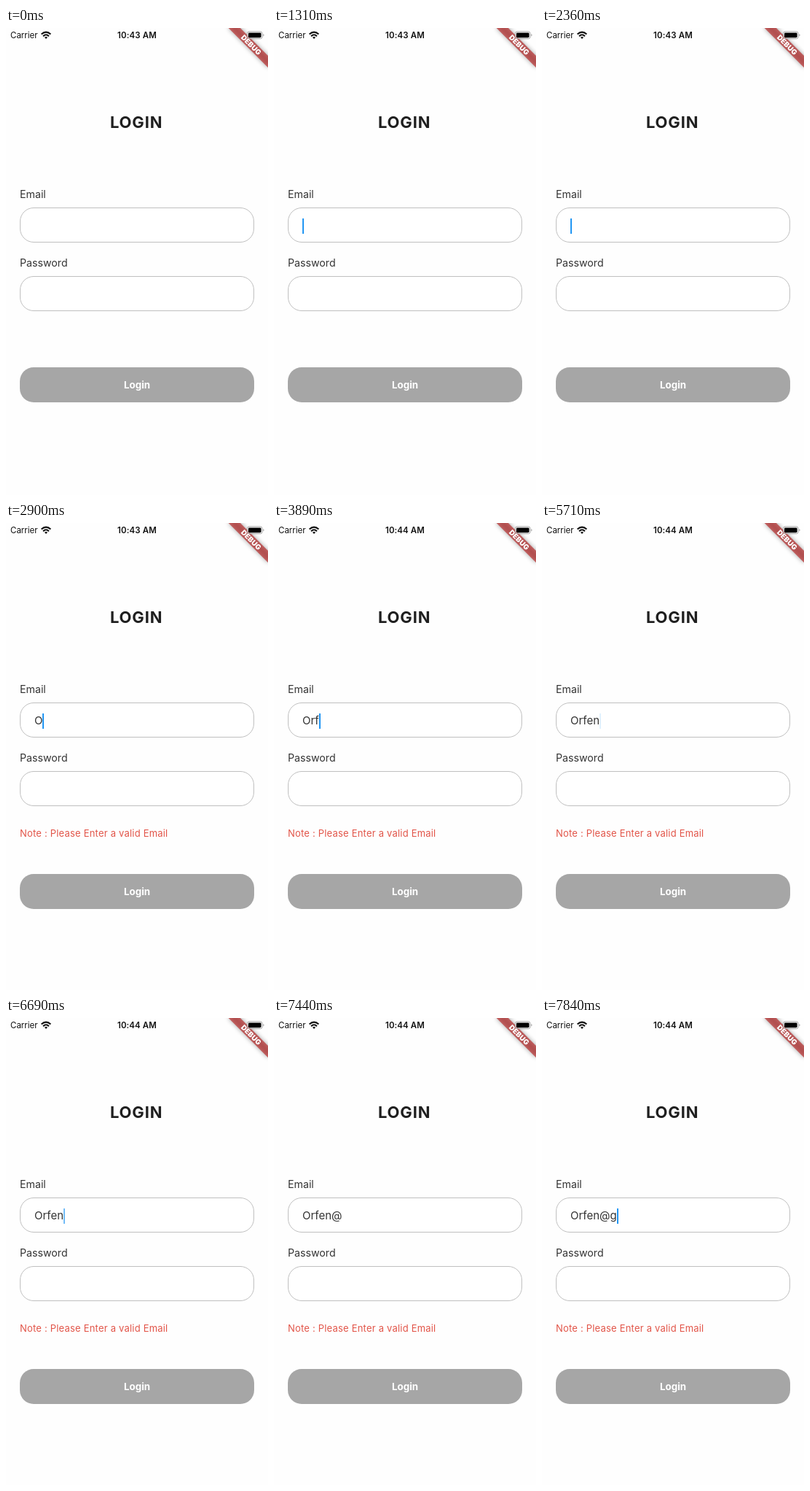
Recreate the animation shown at these times as an HTML page. Size 360 px wide and 640 px high, loop 8 s.

```html
<!DOCTYPE html>
<html lang="en">
<head>
<meta charset="utf-8">
<title>Login form</title>
<style>
  html, body { margin: 0; width: 100%; height: 100%; overflow: hidden; background: #fefefe; }
  body { position: relative; font-family: Inter, Roboto, sans-serif; color: #333; }
  /* Each text line is centred on its cap height. */
  .line { position: absolute; height: 20px; line-height: 20px; white-space: pre; }
  .status { top: 0; font-size: 11.5px; color: #111; }
  #clock { left: 0; width: 360px; text-align: center; font-weight: 600; letter-spacing: .1px; }
  h1.line { margin: 0; left: 143px; top: 119px; font-size: 22px; font-weight: 700; letter-spacing: .8px; color: #1f1f1f; }
  .label { left: 19px; font-size: 14.2px; }
  .field, #button { position: absolute; left: 19px; width: 322px; height: 48px; box-sizing: border-box; border-radius: 19px; }
  .field { border: 1px solid #c0c0c0; background: #fff; }
  #entry { left: 39px; top: 261px; font-size: 15px; display: flex; }
  #caret { width: 2px; height: 20.5px; background: #2196f3; }
  #note { left: 19px; top: 415px; font-size: 13px; letter-spacing: .2px; color: #e25549; }
  #button { background: #a6a6a6; color: #fff; font-size: 13.4px; font-weight: 700; line-height: 48px; text-align: center; }
  svg { position: absolute; left: 0; top: 0; }
</style>
</head>
<body>
  <svg width="360" height="640" viewBox="0 0 360 640">
    <defs>
      <filter id="blur" x="-30%" y="-150%" width="160%" height="400%"><feGaussianBlur stdDeviation="3"/></filter>
      <rect id="band" x="-38.4" y="26.9" width="76.8" height="11.5"/>
    </defs>
    <g transform="translate(360 0) rotate(45)">
      <use href="#band" opacity=".35" filter="url(#blur)"/>
      <use href="#band" fill="#b71c1c" opacity=".63"/>
      <text y="36.2" text-anchor="middle" font-size="9.8" font-weight="900" fill="#fff">DEBUG</text>
    </g>
    <g fill="none" stroke="#111" stroke-width="2">
      <path d="M48.6 8.6Q55 2.6 61.4 8.6"/>
      <path d="M51 11.2Q55 7.4 59 11.2"/>
    </g>
    <path d="M52.9 12.8Q55 11 57.1 12.8L55 15Z" fill="#111"/>
    <rect x="331.5" y="4.9" width="20.6" height="9.8" rx="2.6" fill="#fff" fill-opacity=".4" stroke="#a5a5a5"/>
    <rect x="333" y="6.4" width="17.6" height="6.8" rx="1.4"/>
    <path d="M353.3 8v3.6q1.3-.5 1.3-1.8t-1.3-1.8" fill="#a5a5a5"/>
  </svg>

  <div class="line status" style="left:6px">Carrier</div>
  <div class="line status" id="clock"></div>
  <h1 class="line">LOGIN</h1>

  <div class="line label" style="top:218px">Email</div>
  <div class="field" style="top:246.4px"></div>
  <div class="line" id="entry"><span id="typed"></span><span id="caret"></span></div>

  <div class="line label" style="top:312px">Password</div>
  <div class="field" style="top:340.4px"></div>

  <div class="line" id="note">Note : Please Enter a valid Email</div>
  <div id="button">Login</div>

<script>
  const LOOP = 8000;
  const BLINK = 1050;
  const FOCUS = 1200;
  const FOCUSED = 1310;
  const MINUTE = 3110;
  const ADDRESS = "Orfen@g";
  const KEYS = [2900, 3010, 3890, 4890, 5090, 6790, 7840];

  const [clock, typed, caret, note, button] =
    ["clock", "typed", "caret", "note", "button"].map(id => document.getElementById(id));

  // The caret is solid after each key, then fades out and in once per blink.
  function caretOpacity(t, lastKey) {
    if (t < FOCUS) return 0;
    const phase = (t - lastKey + BLINK) % BLINK;
    const fadeOut = 1 - (phase - 500) / 140;
    const fadeIn = (phase - 860) / 120;
    return Math.min(1, Math.max(0, fadeOut, fadeIn));
  }

  function draw() {
    const t = performance.now() % LOOP;
    const pressed = KEYS.filter(k => k <= t);
    const invalid = pressed.length > 0;
    typed.textContent = ADDRESS.slice(0, pressed.length);
    caret.style.opacity = caretOpacity(t, pressed.at(-1) ?? FOCUSED);
    clock.textContent = t < MINUTE ? "10:43 AM" : "10:44 AM";
    note.style.visibility = invalid ? "visible" : "hidden";
    button.style.top = invalid ? "481.4px" : "465px";
    requestAnimationFrame(draw);
  }
  draw();
</script>
</body>
</html>
```
